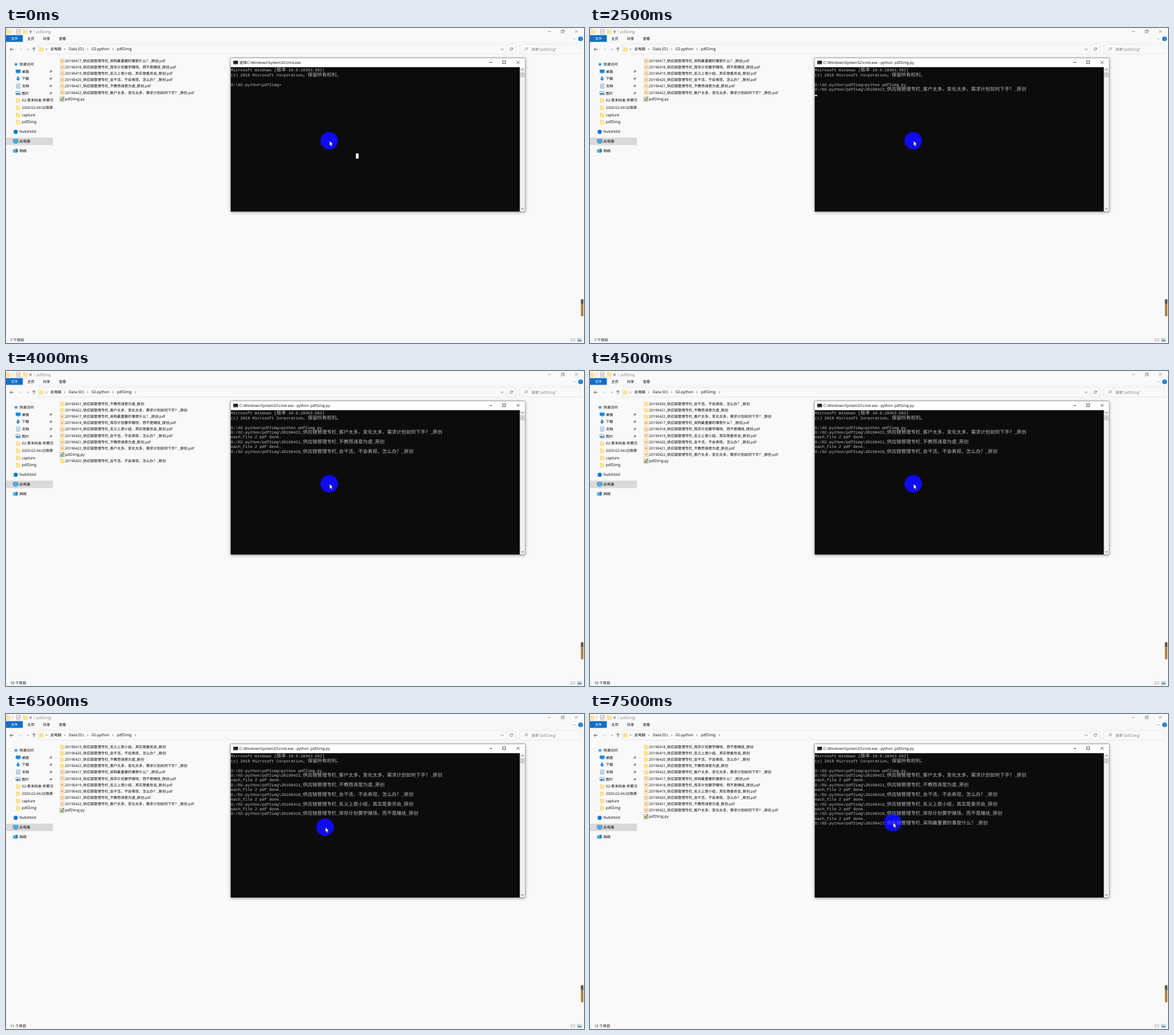
An HTML page that plays this animation: 1013 by 553 pixels, repeating every 8 s.

```html
<!DOCTYPE html>
<html lang="zh-CN">
<head>
<meta charset="utf-8">
<title>pdf2img</title>
<style>
  html, body { margin: 0; width: 100%; height: 100%; overflow: hidden; background: #f9f9f9; }
  svg { display: block; width: 100vw; height: 100vh; }
  text {
    font: 6.33px "Open Sans", "Noto Sans CJK SC", "Noto Sans CJK", sans-serif;
    fill: #000; text-rendering: geometricPrecision;
  }
  .latin { font-size: 6.6px; }
  .title { font-size: 6.48px; }
  .gray { fill: #808080; }
  .term { font: 7.03px "Liberation Mono", monospace; fill: #c4c4c4; }
  .cjk { font: 300 8.44px "Noto Sans CJK SC", "Noto Sans CJK", sans-serif; fill: #bcbcbc; }
  .line { fill: none; stroke: #444; stroke-width: .75; }
  .pale { stroke: #b9b9b9; }
  .shade { filter: drop-shadow(0 1.2px 2.6px #0006); }
  .spot { fill: #0f08f4; }
  .glow { mix-blend-mode: lighten; }
  .veil { opacity: .5; }
</style>
</head>
<body>
<svg viewBox="0 0 1013 553" preserveAspectRatio="none">
  <defs>
    <g id="folder">
      <path d="M0 .4h3l.8 .8h3.6v7H0z" fill="#f5d474"/>
      <path d="M.5 1.4h6.9v6.8H.5z" fill="#ffe294"/>
    </g>
    <g id="pdf">
      <path d="M.4 .4h6.6v7.7H.4z" fill="#fff3df" stroke="#e3ac62" stroke-width=".7"/>
      <path d="M2.2 2.7h3v3h-3z" fill="#e5a047"/>
    </g>
    <g id="script">
      <path d="M0 .8h6.8v7.4H0z" fill="#f2f4ee" stroke="#777" stroke-width=".7"/>
      <path d="M1 3.4h4.6v4H1z" fill="#7dbb3f"/>
      <path d="M3.6 4.2 7.2 .2" stroke="#4c4c4c" stroke-width="1"/>
    </g>
    <path id="pin" d="M2.5 -2.7 5 -.2 4 .2 2.7 1.6 2.5 2.7 1.1 1.3 -.8 3 .4 .7 -.6 -.3 .8 -.6 2 -1.7z" fill="#8b8b8b"/>
    <clipPath id="side"><path d="M0 50h83v180H0z"/></clipPath>
  </defs>

  <path d="M0 0h1013v553H0z" fill="#f9f9f9"/>

  <!-- title bar and ribbon -->
  <use href="#folder" x="1" y="2"/>
  <path d="M12 2.5v7M49.3 2.5v7" class="line pale"/>
  <path d="M18.3 2.4h6.3v7.8h-6.3z" fill="#fff" stroke="#888" stroke-width=".7"/>
  <path d="M19.6 6.2l1.5 1.7 2.6-3.6" fill="none" stroke="#d2492f" stroke-width="1"/>
  <use href="#folder" x="30" y="2"/>
  <path d="M41.3 5h3.6" class="line"/>
  <path d="M41.2 6.5h3.8l-1.9 2z" fill="#333"/>
  <path d="M949.5 6h5.5M973 4.6h4v4h-4zM974.3 4.6V3.3h4v4H977M997 3.3l5 5m0-5-5 5" class="line" style="stroke:#777"/>
  <path d="M0 12.5h29.5v12H0z" fill="#0f6fc5"/>
  <path d="M0 25h1013" class="line" style="stroke:#ececec"/>
  <path d="M994 18l2 2 2-2" class="line" style="stroke:#888"/>
  <circle cx="1007" cy="19" r="4" fill="#0878cb"/>

  <!-- address bar -->
  <path d="M56.4 28.4h837v17.4h-837zM877.5 28.4v17.4M900.5 28.4h106v17.4h-106z" class="line" style="stroke:#dfdfdf"/>
  <path d="M7 37.4h6.5M9.8 34.6 7 37.4l2.8 2.8M48.9 40.8v-6.6M46.1 37l2.8-2.8 2.8 2.8" class="line" style="stroke-width:.9"/>
  <path d="M22.3 37.4h6.4m-2.8-2.8 2.8 2.8-2.8 2.8" class="line" style="stroke:#d2d2d2"/>
  <path d="M36.8 36.7l1.5 1.5 1.5-1.5M867.2 36.3l2.4 2.4 2.4-2.4" class="line"/>
  <use href="#folder" x="58.3" y="33"/>
  <path d="M887.7 35.6a2.4 2.4 0 1 0 .4 2.6M888.1 34.5v1.8h-1.8" class="line"/>
  <circle cx="912" cy="36.2" r="1.9" class="line" style="stroke:#777"/>
  <path d="M910.6 37.6l-2 2" class="line" style="stroke:#777"/>
  <path id="crumbs" class="line"/>

  <!-- navigation pane -->
  <path d="M0 192.6h82.3v12.8H0z" fill="#d9d9d9"/>
  <path d="M17.5 60l1 2.5 2.7.2-2.1 1.7.7 2.6-2.3-1.4-2.3 1.4.7-2.6-2.1-1.7 2.7-.2z" fill="#2d93dc"/>
  <path d="M17 73h8.6v5.8H17zM20 79.5h2.8v.8H20z" fill="#168be0"/>
  <path d="M19.7 85.2h3v3.6H25l-3.8 4.1-3.8-4.1h2.3z" fill="#2788d4"/>
  <path d="M18.3 98h6v7.8h-6z" fill="#f2f7fb" stroke="#7790a3" stroke-width=".7"/>
  <path d="M19.5 100.5h3.6M19.5 102.2h3.6M19.5 103.9h3.6" stroke="#4b9bd2" stroke-width=".7"/>
  <path d="M17.2 111.2h8v6.2h-8z" fill="#e9f4fb" stroke="#6f8697" stroke-width=".7"/>
  <path d="M17.8 116.8v-2l2.2-1.6 2 1.4 1.2-.7 1.6 1.2v1.7z" fill="#358dc5"/>
  <circle cx="17" cy="182.2" r="3.7" fill="#1377cf"/>
  <path d="M12.6 195.2h8.6v5.9h-8.6z" fill="#46aeea" stroke="#48738d" stroke-width=".6"/>
  <path d="M14.2 202.4h5.4" stroke="#48738d" stroke-width=".9"/>
  <path d="M12.8 213.6h5.4v4.7h-5.4z" fill="#58b3e8" stroke="#38729b" stroke-width=".6"/>
  <path d="M17 211.6l3.8 1.3v4.7L17 219.5z" fill="#2f7fb9"/>
  <g id="labels"></g>
  <g id="nav" clip-path="url(#side)"></g>

  <!-- status bar and side handle -->
  <path d="M989 545.6h2m1 0h2m1 0h2.4m-8.4 2.2h2m1 0h2m1 0h2.4m-8.4 2.2h2m1 0h2m1 0h2.4" class="line" style="stroke:#8c8c8c"/>
  <path d="M1001.7 544.8h7v5.5h-7z" fill="#d9ecf7" stroke="#7d9fb5" stroke-width=".6"/>
  <path d="M1002.2 549.8v-1.5l2.1-1.6 1.8 1.1 2.1-.4v2.4z" fill="#5c8aa8"/>
  <rect x="1007.6" y="476" width="4.3" height="30.4" rx="1.8" fill="#aa8145"/>
  <path d="M1007.6 484v-6.2q0-1.8 1.8-1.8h.7q1.8 0 1.8 1.8v6.2z" fill="#555"/>
  <text id="count" x="7.4" y="550.3"></text>
  <g id="files"></g>

  <!-- console window -->
  <path class="shade" d="M393.6 52.5h516.6v269.9H393.6z" fill="#6a6a6a"/>
  <path d="M394 53h515.8v16H394z" fill="#fff"/>
  <path d="M394 68.7h506.6V322H394z" fill="#0c0c0c"/>
  <path d="M900.6 68.7h9.2V322h-9.2z" fill="#f0f0f0"/>
  <path d="M901.2 77.8h8v8.8h-8z" fill="#cdcdcd"/>
  <path d="M903 74.3l2.2-2.2 2.2 2.2M903 316.5l2.2 2.2 2.2-2.2" class="line" style="stroke-width:1"/>
  <path d="M398.3 57.6h8.2v6h-8.2z" fill="#111" stroke="#888" stroke-width=".4"/>
  <path d="M399.5 60l1.2 1-1.2 1M402 62.3h2.5" fill="none" stroke="#ddd" stroke-width=".6"/>
  <path d="M847 60.5h5.2M870.6 57.8h4.8v4.8h-4.8zM895 57.8l5 5m0-5-5 5" class="line" style="stroke:#111"/>
  <text id="caption" class="title" x="409" y="62.8"></text>
  <g id="term"></g>
  <rect id="caret" fill="#f2f2f2"/>
  <g id="mouse">
    <circle class="spot glow" r="15.2"/>
    <circle class="spot veil" r="15.2"/>
    <path d="M.6 .3v8.4l1.9-1.8 1.3 3 1.5-.7-1.3-2.9h2.6z" fill="#fff" stroke="#111" stroke-width=".5"/>
  </g>
</svg>

<script>
const NS = "http://www.w3.org/2000/svg";
const $ = id => document.getElementById(id);
const LOOP = 8000;
const COL = 4.22, ROW = 8.44, TERM_X = 394, TERM_Y = 69;

function add(parent, tag, attrs, content) {
  const el = document.createElementNS(NS, tag);
  for (const key in attrs) el.setAttribute(key, attrs[key]);
  if (content) el.textContent = content;
  parent.appendChild(el);
  return el;
}
const label = (parent, x, y, str, cls = "") =>
  add(parent, "text", { x, y: y + 2.3, class: cls }, str);

// Static captions
const L = $("labels");
[
  [53, 6.2, "pdf2img", "latin gray"], [37.2, 18.8, "主页"], [64.8, 18.8, "共享"], [92.8, 18.8, "查看"],
  [78, 37, "此电脑"], [110, 37, "Data (D:)", "latin"], [150, 37, "02-python", "latin"],
  [194.5, 37, "pdf2img", "latin"], [921, 37.3, "搜索\"pdf2img\"", "latin gray"],
  [23.5, 63.6, "快速访问"], [23.5, 182, "NubiHold", "latin"], [23.5, 199, "此电脑"], [23.5, 215.6, "网络"]
].forEach(a => label(L, ...a));
label(L, 8.4, 18.6, "文件").style.fill = "#fff";
label(L, 1005.5, 19.2, "?").style.fill = "#fff";

const nav = $("nav");
["桌面", "下载", "文档", "图片", "02-青禾码舍-积累交流", "2020-02-04-比陌满", "capture", "pdf2img"]
  .forEach((str, i) => {
    const y = 76.3 + i * 12.68;
    label(nav, 27.8, y, str, i > 5 ? "latin" : "");
    if (i < 4) add(nav, "use", { href: "#pin", x: 76.5, y });
    else add(nav, "use", { href: "#folder", x: 17.5, y: y - 4 });
  });

// Documents by date
const DOCS = [
  "采购最重要的事是什么？", "库存计划要学赌场，而不是赌徒", "名义上是小组，其实是委员会",
  "会干活，不会表现，怎么办？", "不教而诛是为虐", "客户太多，变化太多，需求计划如何下手？"
].map((name, i) => `${20190417 + i}_供应链管理专栏_${name}_原创`);

function drawFiles(sorted, fresh) {
  const box = $("files"), total = DOCS.length;
  const rows = [
    ...DOCS.slice(total - sorted).map(s => ["folder", s]),
    ...DOCS.map(s => ["pdf", s + ".pdf"]),
    ["script", "pdf2img.py"]
  ];
  if (fresh) rows.push(["folder", DOCS[total - sorted - 1]]);
  box.replaceChildren();
  rows.forEach(([icon, str], i) => {
    const y = 57.7 + i * 11.11;
    add(box, "use", { href: "#" + icon, x: 94.7, y: y - 4.1 });
    label(box, 103.3, y, str, icon === "script" ? "latin" : "");
  });
  $("count").textContent = rows.length + " 个项目";
}

function drawTerm(typed, paths) {
  const box = $("term");
  const rows = [
    "Microsoft Windows [版本 10.0.18363.592]",
    "(c) 2019 Microsoft Corporation。保留所有权利。",
    "",
    "D:\\02-python\\pdf2img>" + typed
  ];
  for (let i = 0; i < paths; i++) {
    if (i) rows.push("each_file 2 pdf done.");
    rows.push("D:/02-python/pdf2img\\" + DOCS[DOCS.length - 1 - i]);
  }
  box.replaceChildren();
  rows.forEach((str, i) => {
    const el = add(box, "text", { x: TERM_X, y: TERM_Y + 7.2 + i * ROW, class: "term" });
    for (const part of str.split(/([\u3000-\u9fff\uff00-\uffef]+)/)) {
      if (part) add(el, "tspan", { class: part.charCodeAt(0) > 0x2fff ? "cjk" : "" }, part);
    }
  });
}

function drawCaret(kind) {
  const at = {
    block: [613.2, 220.4, 4.8, 8.8],
    prompt: [TERM_X + 27 * COL, TERM_Y + 3 * ROW + 6.2, COL, 2.1],
    output: [TERM_X, TERM_Y + 5 * ROW + 6.2, COL, 2.1]
  }[kind] || [0, 0, 0, 0];
  ["x", "y", "width", "height"].forEach((key, i) => $("caret").setAttribute(key, at[i]));
}

const PY = "python", RUN = "python pdf2img.py";
const HOME = [566.5, 198], NEAR = [559.3, 198.7], LAST = [530.8, 190.6];

// start, typed command, printed paths, sorted folders, fresh folder, caret, pointer
const STEPS = [
  [0, "", 0, 0, 0, "block", HOME],
  [500, PY, 0, 0, 0, "prompt", HOME],
  [1500, PY, 0, 0, 0, "", HOME],
  [2000, RUN, 0, 0, 0, "", HOME],
  [2500, RUN, 1, 0, 0, "output", HOME],
  [3000, RUN, 2, 0, 1, "", HOME],
  [3500, RUN, 2, 1, 1, "", HOME],
  [4000, RUN, 3, 2, 1, "", HOME],
  [4500, RUN, 3, 3, 0, "", HOME],
  [5000, RUN, 4, 3, 0, "", HOME],
  [5500, RUN, 4, 4, 0, "", HOME],
  [6500, RUN, 5, 4, 0, "", NEAR],
  [7000, RUN, 5, 5, 0, "", NEAR],
  [7500, RUN, 6, 5, 0, "", LAST]
];

function show([start, typed, paths, sorted, fresh, caret, pointer]) {
  drawFiles(sorted, fresh);
  drawTerm(typed, paths);
  drawCaret(caret);
  $("caption").textContent = (start ? "" : "选择") + "C:\\Windows\\System32\\cmd.exe" +
    (paths ? " - python \u00a0pdf2img.py" : "");
  const marks = [71, 103, 143, 187];
  if (start >= 3500) marks.push(226.5);
  $("crumbs").setAttribute("d", marks.map(x => `M${x - .7} 35.6l1.5 1.6-1.5 1.6`).join(""));
  $("mouse").setAttribute("transform", `translate(${pointer})`);
}

let current = null;
function tick() {
  const t = performance.now() % LOOP;
  const step = STEPS.findLast(s => s[0] <= t);
  if (step !== current) show(current = step);
  requestAnimationFrame(tick);
}
tick();
</script>
</body>
</html>
```
